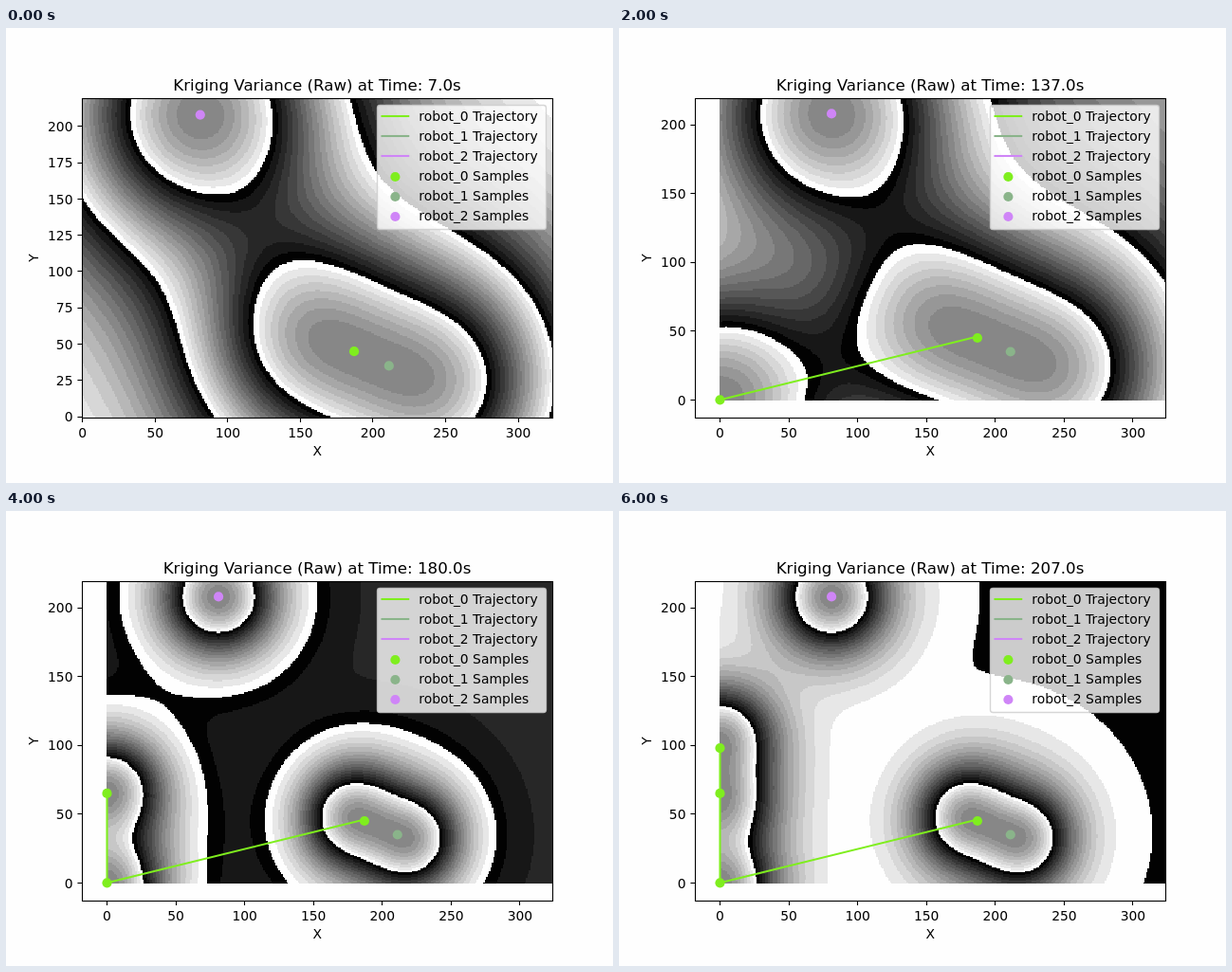
These frames come from a looping animation (640 by 480 pixels, 8 s). An HTML page with a canvas:

```html
<!DOCTYPE html>
<html lang="en">
<head>
<meta charset="utf-8">
<title>Kriging variance</title>
<style>
html, body { margin: 0; width: 100%; height: 100%; overflow: hidden; background: #fefefe; }
canvas, svg { position: absolute; left: 0; top: 0; width: 640px; height: 480px; }
text { font: 13.89px "DejaVu Sans", sans-serif; fill: #000; }
.title { font-size: 16.67px; }
.mid { text-anchor: middle; }
.end { text-anchor: end; }
</style>
</head>
<body>
<canvas id="map" width="640" height="480"></canvas>
<svg id="plot" viewBox="0 0 640 480"></svg>
<script>
const COLS = 324, ROWS = 220, HOLD = 2000;
const COLORS = ["#7fee1e", "#8ab48a", "#cf85f7"];
// One starting sample per robot, then the later stops of robot 0
const SAMPLES = [[187, 45], [211, 35], [81, 208], [0, 0], [0, 65], [0, 98]];
const PATH_START = [187, 46];
const NEAR = { x0: 80.77, y0: 410.05, k: 1.531, step: 25 };
const WIDE = { x0: 106.5, y0: 392.3, k: 1.4515, step: 50 };
// count: samples taken, range: correlation length, top: variance far from all samples
const STATES = [
  { time: "7.0", count: 3, range: 118, top: 652, view: NEAR },
  { time: "137.0", count: 4, range: 120, top: 554, view: WIDE },
  { time: "180.0", count: 5, range: 53.8, top: 420.5, view: WIDE },
  { time: "207.0", count: 6, range: 51.9, top: 386.1, view: WIDE }
];

function invert(m) {
  const n = m.length;
  const a = m.map((row, i) => [...row, ...row.map((_, j) => +(i === j))]);
  for (let i = 0; i < n; i++) {
    const pivot = a[i][i];
    a[i] = a[i].map(v => v / pivot);
    for (let r = 0; r < n; r++) {
      if (r === i) continue;
      const f = a[r][i];
      a[r] = a[r].map((v, j) => v - f * a[i][j]);
    }
  }
  return a.map(row => row.slice(n));
}

// Ordinary kriging variance with a Gaussian model, wrapped to a signed byte
function field({ count, range, top }) {
  const pts = SAMPLES.slice(0, count);
  const cov = (x, y, p) => Math.exp(-((x - p[0]) ** 2 + (y - p[1]) ** 2) / range ** 2);
  const inv = invert(pts.map(p => pts.map(q => cov(p[0], p[1], q))));
  const ones = inv.map(row => row.reduce((s, v) => s + v, 0));
  const mass = ones.reduce((s, v) => s + v, 0);
  const scale = top / (1 + 1 / mass);
  const cv = document.createElement("canvas");
  cv.width = COLS;
  cv.height = ROWS;
  const g = cv.getContext("2d"), img = g.createImageData(COLS, ROWS);
  const c = new Float64Array(count);
  for (let y = 0, o = 0; y < ROWS; y++) {
    for (let x = 0; x < COLS; x++, o += 4) {
      for (let i = 0; i < count; i++) c[i] = cov(x, ROWS - 1 - y, pts[i]);
      let known = 0, sum = 0;
      for (let i = 0; i < count; i++) {
        sum += ones[i] * c[i];
        for (let j = 0; j < count; j++) known += c[i] * c[j] * inv[i][j];
      }
      const v = scale * (1 - known + (1 - sum) ** 2 / mass);
      const band = ((128 + Math.max(0, v)) & 255) >> 4;
      const grey = band === 0 ? 2 : band === 15 ? 254 : band * 16 + 7;
      img.data.set([grey, grey, grey, 255], o);
    }
  }
  g.putImageData(img, 0, 0);
  return cv;
}

const text = (x, y, s, cls = "") => `<text x="${x}" y="${y}" class="${cls}">${s}</text>`;
const line = (pts, color) =>
  `<polyline points="${pts.join(" ")}" fill="none" stroke="${color}" stroke-width="2.08" stroke-linecap="square" stroke-linejoin="round"/>`;
const dot = (x, y, color) => `<circle cx="${x}" cy="${y}" r="5.1" fill="${color}"/>`;
const tick = (x1, y1, x2, y2) => `<path d="M${x1} ${y1}L${x2} ${y2}" stroke="#000" stroke-width="1.1"/>`;
const snap = v => Math.floor(v) + 0.5;

function legend() {
  let s = `<rect x="391.5" y="81.5" width="178" height="131" rx="2.8" fill="#fff" fill-opacity=".8" stroke="#ccc" stroke-opacity=".8" stroke-width="1.39"/>`;
  COLORS.forEach((color, i) => {
    const y = Math.round(93 + 21.2 * i), y2 = y + 64;
    s += line([[396.5, y], [424.2, y]], color) + text(435.3, y + 4.6, `robot_${i} Trajectory`);
    s += dot(410.4, y2, color) + text(435.3, y2 + 4.4, `robot_${i} Samples`);
  });
  return s;
}

function chart({ time, count, view }) {
  const px = x => view.x0 + x * view.k, py = y => view.y0 - y * view.k;
  const place = ([x, y]) => [px(x), py(y)];
  const pts = SAMPLES.slice(0, count).map(place);
  let s = pts.map((p, i) => dot(p[0], p[1], COLORS[i < 3 ? i : 0])).join("");
  if (count > 3) s += line([place(PATH_START), ...pts.slice(3)], COLORS[0]);
  s += `<rect x="80.5" y="74.5" width="496" height="337" fill="none" stroke="#000" stroke-width="1.1"/>`;
  for (let v = 0; v <= 300; v += 50) {
    const x = snap(px(v));
    s += tick(x, 411, x, 416) + text(px(v), 431.5, v, "mid");
  }
  for (let v = 0; v <= 200; v += view.step) {
    const y = snap(py(v));
    s += tick(75.4, y, 80, y) + text(70.5, py(v) + 5.2, v, "end");
  }
  s += text(328, 65.6, `Kriging Variance (Raw) at Time: ${time}s`, "title mid");
  s += text(328.3, 451, "X", "mid");
  s += `<text class="mid" transform="translate(34 242.4) rotate(-90)">Y</text>`;
  return s + legend();
}

const ctx = document.getElementById("map").getContext("2d");
const plot = document.getElementById("plot");
const scenes = STATES.map(st => ({ map: field(st), svg: chart(st), view: st.view }));
let shown = -1;

function show(i) {
  if (i === shown) return;
  shown = i;
  const { map, svg, view: { x0, y0, k } } = scenes[i];
  ctx.clearRect(0, 0, 640, 480);
  ctx.imageSmoothingEnabled = false;
  ctx.drawImage(map, x0 - k / 2, y0 - (ROWS - 0.5) * k, COLS * k, ROWS * k);
  plot.innerHTML = svg;
}

const start = performance.now();
function frame() {
  show(Math.floor((performance.now() - start) / HOLD) % scenes.length);
  requestAnimationFrame(frame);
}
frame();
</script>
</body>
</html>
```
